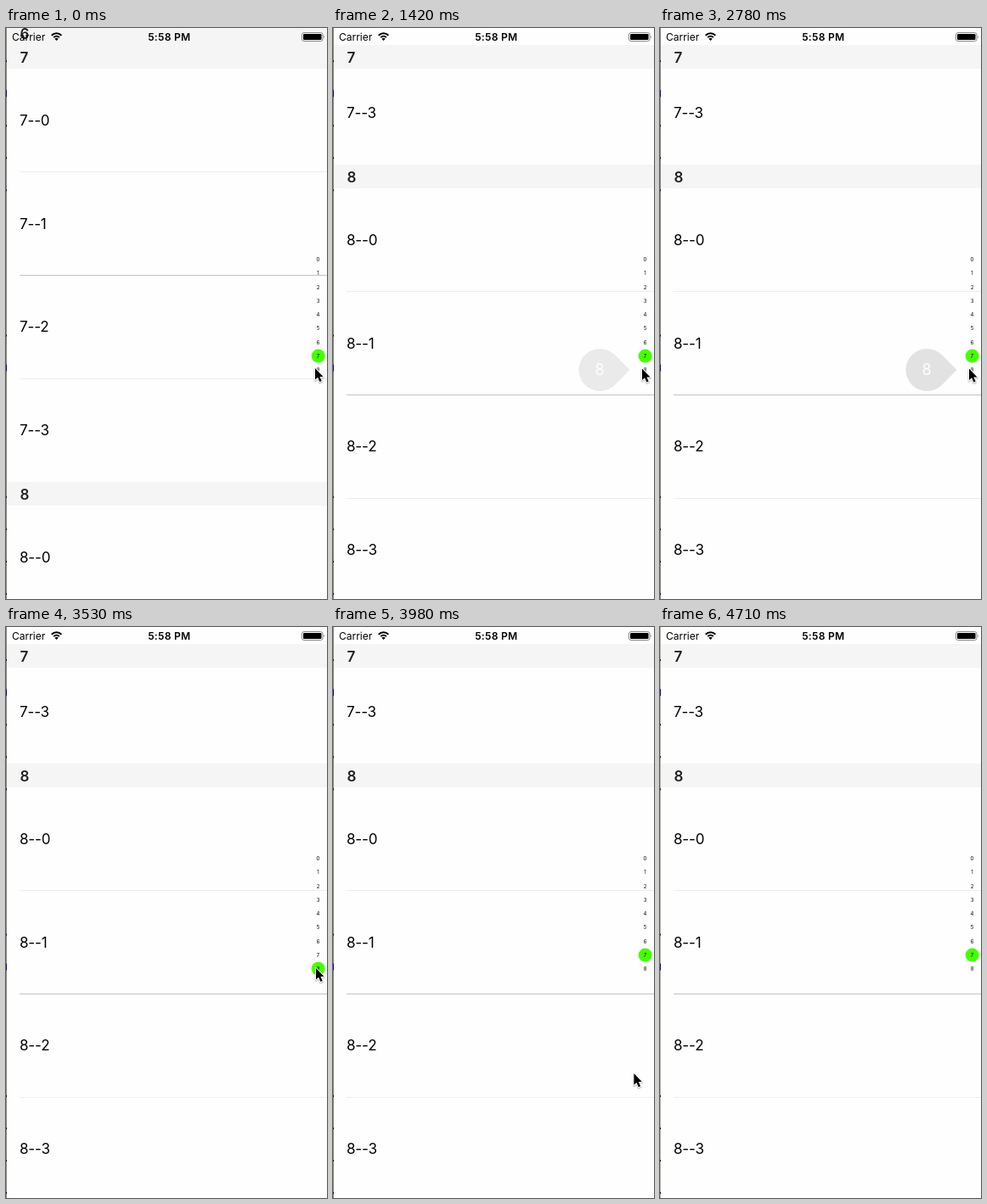
An HTML page for the animation above (4810 ms loop, 378 px wide and 673 px high).

```html
<!DOCTYPE html>
<html lang="en">
<head>
<meta charset="utf-8">
<title>Section index list</title>
<style>
  html, body { margin: 0; width: 100%; height: 100%; overflow: hidden; background: #fefefe; }
  svg { display: block; width: 378px; height: 673px; }
  text { font-family: Inter, Roboto, "Liberation Sans", sans-serif; font-size: 17px; fill: #000; }
  .cell { letter-spacing: -0.15px; }
  .head { font-weight: 600; fill: #222; }
  .status { font-size: 12px; }
  .index { font-size: 6px; text-anchor: middle; }
  .letter { font-size: 18px; fill: #fff; text-anchor: middle; }
</style>
</head>
<body>
<svg id="stage" viewBox="0 0 378 673"></svg>
<script>
const LOOP = 4810, JUMP = 890;
const BAR = 20, HEAD = 28, CELL = 121.75, ROWS = 4;
const SECTION = HEAD + ROWS * CELL;
const stage = document.getElementById('stage');

function add(parent, tag, attrs, text) {
  const el = document.createElementNS('http://www.w3.org/2000/svg', tag);
  for (const name in attrs) el.setAttribute(name, attrs[name]);
  if (text !== undefined) el.textContent = text;
  parent.appendChild(el);
  return el;
}

const rect = (parent, x, y, width, height, fill) =>
  add(parent, 'rect', { x, y, width, height, fill });

const clamp = v => Math.max(0, Math.min(1, v));
const progress = (t, from, duration) => clamp((t - from) / duration);

// Sections 6 to 8, with section 7 starting at the given y; headers stick below the bar
function list(top) {
  const group = add(stage, 'g', {});
  for (let section = 6; section <= 8; section++) {
    const y = top + (section - 7) * SECTION;
    for (let row = 0; row < ROWS; row++) {
      const cellY = y + HEAD + row * CELL;
      add(group, 'text', { x: 16, y: cellY + CELL / 2 + 6, class: 'cell' }, `${section}--${row}`);
      if (row < ROWS - 1) {
        const line = rect(group, 16, Math.floor(cellY + CELL), 362, 1, '#c3c3c3');
        line.setAttribute('opacity', row === 1 ? 1 : 0.3);
      }
    }
    const headY = Math.min(Math.max(y, BAR), y + SECTION - HEAD);
    rect(group, 0, headY, 378, HEAD, '#f5f5f5');
    add(group, 'text', { x: 16.5, y: headY + 21, class: 'head' }, section);
  }
  return group;
}

const before = list(BAR);
const after = list(BAR - 374);

// Status bar
add(stage, 'text', { x: 7, y: 14.8, class: 'status' }, 'Carrier');
add(stage, 'text', {
  x: 192.3, y: 14.8, class: 'status', 'font-weight': 600,
  'text-anchor': 'middle', 'letter-spacing': 0.3
}, '5:58 PM');
const wifi = add(stage, 'g', { fill: 'none', stroke: '#000', 'stroke-width': 2 });
for (const r of [4.8, 8.3]) {
  const d = r * 0.7;
  add(wifi, 'path', { d: `M${59.5 - d} ${14.5 - d}A${r} ${r} 0 0 1 ${59.5 + d} ${14.5 - d}` });
}
add(stage, 'path', { d: 'M59.5 15L57.3 12.8A3.1 3.1 0 0 1 61.7 12.8Z' });
add(stage, 'rect', {
  x: 348.5, y: 5.5, width: 24.5, height: 10, rx: 2.5, fill: 'none', stroke: '#888'
});
add(stage, 'rect', { x: 350, y: 7, width: 21.5, height: 7, rx: 1.2 });
add(stage, 'path', { d: 'M374 8.7Q375.6 10.5 374 12.3Z', fill: '#777' });

// Sliver of the text window behind, with a few runs of marked lines
const edge = rect(stage, 0, 0, 1, 673, '#8b897a');
for (const [first, last] of [[2, 10], [19, 21], [29, 35]]) {
  for (let line = first; line <= last; line += 2) {
    const tall = line % 17 === 4;
    rect(stage, 0, line * 19.03 - (tall ? 3 : 0), 1, tall ? 8 : 2, tall ? '#10107a' : '#111');
  }
}

// Index strip
const indexY = i => 273 + 16.22 * i;
const dot = add(stage, 'circle', { cx: 367.7, r: 8, fill: '#46ff00' });
for (let i = 0; i < 9; i++) {
  add(stage, 'text', { x: 367.5, y: indexY(i) + 2.2, class: 'index' }, i);
}

const bubble = add(stage, 'g', {});
add(bubble, 'path', {
  d: 'M349.5 403L332 385.3A25 25 0 1 0 332 420.7Z', fill: '#c8c8c8'
});
add(bubble, 'text', { x: 314, y: 409.4, class: 'letter' }, 8);

const cursor = add(stage, 'g', {});
const arrow = 'M0 0V13.6L3.1 10.7L5.4 16L7.7 15L5.4 9.9H9.5Z';
add(cursor, 'path', {
  d: arrow, transform: 'translate(0 1)', fill: 'none', stroke: '#000',
  'stroke-opacity': 0.18, 'stroke-width': 3, 'stroke-linejoin': 'round'
});
add(cursor, 'path', {
  d: arrow, fill: '#000', stroke: '#fff', 'stroke-width': 1.8,
  'stroke-linejoin': 'round', 'paint-order': 'stroke'
});

// The first bubble stalls part-way through its fade
const presses = [
  { down: JUMP, up: 1310, rest: 0.36 },
  { down: 2280, up: 2690, rest: 0 },
  { down: 3530, up: 3760, rest: 0 }
];

function bubbleOpacity(t, current, previous) {
  const shown = progress(t, current.down + 140, 80);
  const faded = 1 - progress(t, current.up, 130) ** 2;
  const leftover = previous ? previous.rest : 0;
  return t < current.up
    ? Math.max(leftover, shown)
    : Math.max(current.rest, faded);
}

function cursorAt(t) {
  const nudge = t < 2820 ? 0 : 1 - progress(t, 3120, 210);
  const pressed = t < 680 ? 0 : 0.5;
  const settled = t < 2820 ? 0 : 1;
  const leave = 1 - (1 - progress(t, 3780, 520)) ** 1.2;
  return {
    x: 364 + settled + 2 * nudge - 54 * leave ** 2,
    y: 401 + pressed + settled / 2 + 3 * nudge + 280 * leave
  };
}

function draw(t) {
  const jumped = t >= JUMP;
  before.setAttribute('display', jumped ? 'none' : 'inline');
  after.setAttribute('display', jumped ? 'inline' : 'none');

  const n = presses.filter(press => t >= press.down).length - 1;
  const current = presses[n];
  const held = current && t < current.up;
  dot.setAttribute('cy', indexY(held ? 8 : 7));
  bubble.setAttribute('opacity', current ? bubbleOpacity(t, current, presses[n - 1]) : 0);

  const { x, y } = cursorAt(t);
  cursor.setAttribute('transform', `translate(${x} ${y})`);
  cursor.setAttribute('display', t < 4300 ? 'inline' : 'none');
  edge.setAttribute('fill', t < 4710 ? '#8b897a' : '#b9b5a0');
}

const start = performance.now();
function tick() {
  draw((performance.now() - start) % LOOP);
  requestAnimationFrame(tick);
}
tick();
</script>
</body>
</html>
```
